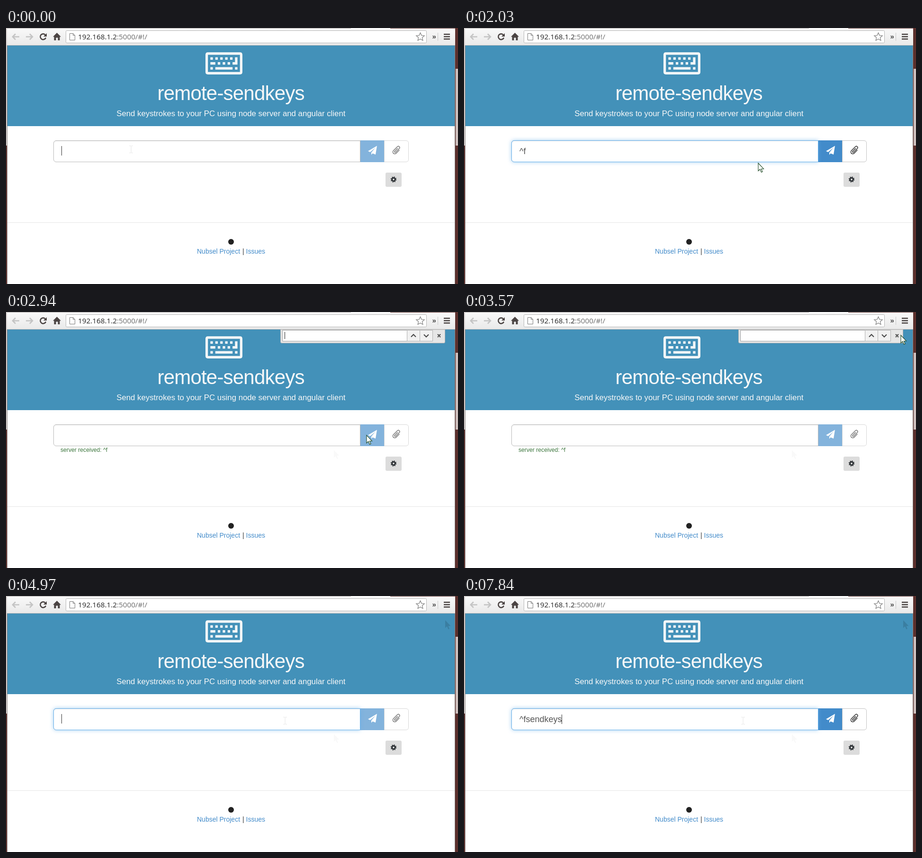
Animation of 954 by 540 pixels, one loop 8000 ms. Source, as an HTML page:

```html
<!DOCTYPE html>
<html lang="en">
<head>
<meta charset="utf-8">
<title>remote-sendkeys</title>
<style>
html, body { margin: 0; width: 100%; height: 100%; overflow: hidden; background: #fff; }
svg, div { position: absolute; left: 0; top: 0; box-sizing: border-box; }
svg { width: 954px; height: 540px; }
text { font-family: "Liberation Sans", Arial, sans-serif; white-space: pre; }
.field { left: 100px; top: 237px; width: 648px; height: 46px; border: 1px solid #bbb;
  border-radius: 6px 0 0 6px; background: #fff; box-shadow: inset 0 1px 1px rgba(0,0,0,.1); }
#glow { border-color: #66afe9; box-shadow: inset 0 1px 1px rgba(0,0,0,.075), 0 0 8px rgba(102,175,233,.6); }
</style>
</head>
<body>
<svg viewBox="0 0 954 540">
  <defs>
    <linearGradient id="bar" x2="0" y2="1"><stop stop-color="#f9f9f9"/><stop offset="1" stop-color="#e9e9e9"/></linearGradient>
    <path id="arrow" d="M0 0V16.5L3.8 13L6.5 19.3L9 18.2L6.4 12.2H11.5Z"/>
  </defs>

  <!-- desktop edges -->
  <path fill="#5c302d" d="M0 0H954V540H0Z"/>
  <path fill="#d2cbca" d="M0 0H3V248H0Z"/>
  <path fill="#cdbfbd" d="M949 86H954V248H949Z"/>
  <path fill="#fff" d="M3 37H947V540H3Z"/>
  <path fill="#8b8584" d="M2 37H3V540H2ZM947 37H948V540H947Z"/>

  <!-- browser toolbar -->
  <path fill="url(#bar)" d="M2 1H948V37H2Z"/>
  <path fill="#a9a5a4" d="M2 0H728V1H2Z"/>
  <path fill="#f4f4f4" d="M728 0H811V1H728Z"/>
  <path fill="#b9b9b9" d="M2 36H948V37H2Z"/>
  <g fill="none" stroke="#c4c4c4" stroke-width="2.6">
    <path d="M28 18.5H15M20 12.5L14 18.5L20 24.5M42 18.5H55M50 12.5L56 18.5L50 24.5"/>
    <path stroke="#4b4443" d="M83 14.5A6 6 0 1 0 84 20.5"/>
  </g>
  <path fill="#4b4443" d="M86 11V18H79ZM107.5 10L116 18.5H113.5V26H109.500V20.500H105.500V26H101.500V18.5H99ZM924 12h13v2.600h-13zM924 17h13v2.600h-13zM924 22h13v2.600h-13z"/>
  <rect x="126.5" y="5.5" width="761" height="26" rx="2" fill="#fff" stroke="#b5b5b5"/>
  <path fill="#fff" stroke="#777" d="M134.500 11.500H141.500L145.500 15.500V25.500H134.500ZM141.500 11.500V15.500H145.500"/>
  <text x="152" y="24" fill="#222" style="font:15.25px 'Open Sans','Noto Sans',sans-serif">192.168.1.2<tspan fill="#6c6c6c">:5000/#!/</tspan></text>
  <path id="star" fill="#fff" stroke="#858585" stroke-width="1.3"/>
  <text x="899.500" y="23" font-size="15" font-weight="bold" fill="#444">»</text>
  <path stroke="#c8c8c8" d="M911.5 10V27"/>

  <!-- page header -->
  <path fill="#4391b9" d="M3 37H947V207H3Z"/>
  <g fill="#f8f8f8">
    <path fill-rule="evenodd" transform="translate(421 51.300) scale(.0406)" d="M128 0H1792Q1920 0 1920 128V1024Q1920 1152 1792 1152H128Q0 1152 0 1024V128Q0 0 128 0ZM128 128V1024H1792V128Z
      M256 256h128v128h-128zM512 256h128v128h-128zM768 256h128v128h-128zM1024 256h128v128h-128zM1280 256h128v128h-128z
      M256 512h256v128h-256zM640 512h128v128h-128zM896 512h128v128h-128zM1152 512h128v128h-128z
      M1536 256h128v384h-256v-128h128z
      M256 768h128v128h-128zM512 768h896v128h-896zM1536 768h128v128h-128z"/>
    <text x="319.500" y="152" font-size="42" letter-spacing="-.8">remote-sendkeys</text>
    <text x="233.200" y="186" font-size="16.8">Send keystrokes to your PC using node server and angular client</text>
  </g>

  <!-- form buttons -->
  <g id="buttons">
    <path id="send" d="M747 237H799V283H747Z"/>
    <path fill="#fff" d="M783 248.500L764 259.800L768.700 261.800L779.500 252.500L771 262.800V267.500L773.700 264.400L780 267Z"/>
    <path fill="#fff" stroke="#c4c4c4" d="M798.500 237.500H844Q849.500 237.500 849.500 243V277Q849.500 282.500 844 282.500H798.500Z"/>
    <path fill="none" stroke="#333" stroke-width="1.5" transform="translate(824 258) rotate(45)" d="M4 -5V5a4 4 0 0 1-8 0V-7a2.800 2.800 0 0 1 5.600 0V4a1.400 1.400 0 0 1-2.800 0V-5"/>
  </g>
  <rect x="801" y="305" width="34" height="30" rx="3" fill="#dcdcdc"/>
  <g fill="none" stroke="#2b2f33" transform="translate(818 319.500)">
    <circle r="3.300" stroke-width="2.800"/>
    <circle r="5.200" stroke-width="2" stroke-dasharray="2.042"/>
  </g>

  <!-- footer -->
  <path fill="#e6e6e6" d="M3 410H947V411H3Z"/>
  <circle cx="475" cy="451" r="6" fill="#222"/>
  <g font-size="14" fill="#428bca">
    <text x="403" y="476">Nubsel Project</text>
    <text x="499" y="476" fill="#333">|</text>
    <text x="506.500" y="476">Issues</text>
  </g>
</svg>

<div class="field"></div>
<div class="field" id="glow"></div>

<svg viewBox="0 0 954 540">
  <text id="typed" x="117" y="265.500" font-size="18" fill="#555"></text>
  <rect id="caret" width="1" height="20" fill="#333"/>
  <text id="status" x="115" y="295" font-size="12.2" fill="#3c763d"></text>

  <g id="find">
    <path fill="#e6e6e6" stroke="#b4b4b4" d="M579.500 37V63Q579.500 65.500 582 65.500H924Q926.500 65.500 926.500 63V37Z"/>
    <path fill="#fff" stroke="#a2a2a2" d="M583.500 38.500H846.500V61.500H583.500Z"/>
    <path fill="#f1f1f1" stroke="#b0b0b0" d="M846.500 38.500H900.500V61.500H846.500ZM873.500 38.500V61.500"/>
    <path fill="none" stroke="#444" stroke-width="2" d="M855 52.500L860 47.500L865 52.500M882 47.500L887 52.500L892 47.500M911 47L917 53M917 47L911 53"/>
    <path id="findCaret" fill="#222" d="M588 42h1v15h-1z"/>
  </g>

  <use id="faintLow" href="#arrow" x="692" y="291" opacity=".025"/>
  <use id="faintTop" href="#arrow" x="927" y="51" opacity=".13"/>
  <path id="beam" fill="none" stroke="#e4e4e4" d="M-3.500 -7.500H-1L0 -6.500L1 -7.500H3.500M0 -6.500V6.500M-3.500 7.500H-1L0 6.500L1 7.500H3.500"/>
  <use id="mouse" href="#arrow" fill="#fff" stroke="#1f4a26" stroke-width="1.1"/>
</svg>

<script>
const LOOP = 8000, STEP = 70;
const $ = id => document.getElementById(id);
const clamp = v => Math.max(0, Math.min(1, v));
const show = (id, on) => $(id).style.display = on ? "" : "none";
const within = (t, a, b) => t >= a && t < b;

const phrase = "^fsendkeys";
const firstKeys = [1050, 1260];
const secondKeys = [5600, 6160, 6440, 6650, 7000, 7210, 7420, 7490, 7700, 7840];
const SENT = 2310, REFOCUS = 4270;

// time, x, y
const path = [
  [1680, 264, 256], [2100, 692, 291], [2240, 761, 260], [3080, 761, 260],
  [3430, 942, 56], [3640, 912, 46], [3780, 912, 46], [4060, 610, 216]
];

function pointer(t) {
  if (t >= REFOCUS) return [589, 263];
  if (t <= path[0][0]) return path[0].slice(1);
  const i = path.findIndex(p => p[0] >= t);
  if (i < 0) return path.at(-1).slice(1);
  const [t0, x0, y0] = path[i - 1], [t1, x1, y1] = path[i];
  const k = (t - t0) / (t1 - t0);
  return [x0 + (x1 - x0) * k, y0 + (y1 - y0) * k];
}

function focus(t) {
  if (t < 2270) return clamp(t / 140);
  if (t < REFOCUS) return clamp(1 - (t - 2270) / 150);
  return clamp((t - REFOCUS) / 210);
}

function statusOpacity(t) {
  return t < 4690 ? clamp((t - 2520) / 210) : clamp(1 - (t - 4690) / 280);
}

function render(t) {
  const keys = t < SENT ? firstKeys : secondKeys;
  const count = keys.filter(k => t >= k).length;
  const typed = $("typed");
  typed.textContent = phrase.slice(0, count);
  $("caret").setAttribute("x", Math.floor(117 + (count ? typed.getComputedTextLength() : 0)));
  $("caret").setAttribute("y", count ? 250 : 249);
  show("caret", t < 630 || within(t, 1050, 1820) || (t >= REFOCUS && !within(t, 6090, 6160)));

  $("glow").style.opacity = focus(t);
  $("buttons").setAttribute("opacity", count ? 1 : .65);
  $("send").setAttribute("fill", within(t, 2170, SENT) ? "#3276b1" : "#428bca");

  $("status").textContent = t < 2940 ? "sending: ^f" : "server received: ^f";
  $("status").setAttribute("opacity", statusOpacity(t));

  show("find", within(t, 2940, 3850));
  show("findCaret", t < 3470);
  show("faintLow", t >= 2170);
  show("faintTop", t >= 3640);

  const [x, y] = pointer(t).map(Math.round);
  const overField = x < 747 && y > 237 && y < 283;
  const place = `translate(${x} ${y})`;
  $("beam").setAttribute("transform", place);
  $("mouse").setAttribute("transform", place);
  show("beam", overField);
  show("mouse", !overField && t < 4060);
}

function frame(now) {
  render(Math.floor(now % LOOP / STEP) * STEP);
  requestAnimationFrame(frame);
}

$("star").setAttribute("d", "M" + Array.from({ length: 10 }, (_, i) => {
  const a = i * Math.PI / 5, r = i % 2 ? 4.2 : 9;
  return [874.5 + r * Math.sin(a), 19 - r * Math.cos(a)].map(v => v.toFixed(1));
}).join("L") + "Z");
render(0);
requestAnimationFrame(frame);
</script>
</body>
</html>
```
